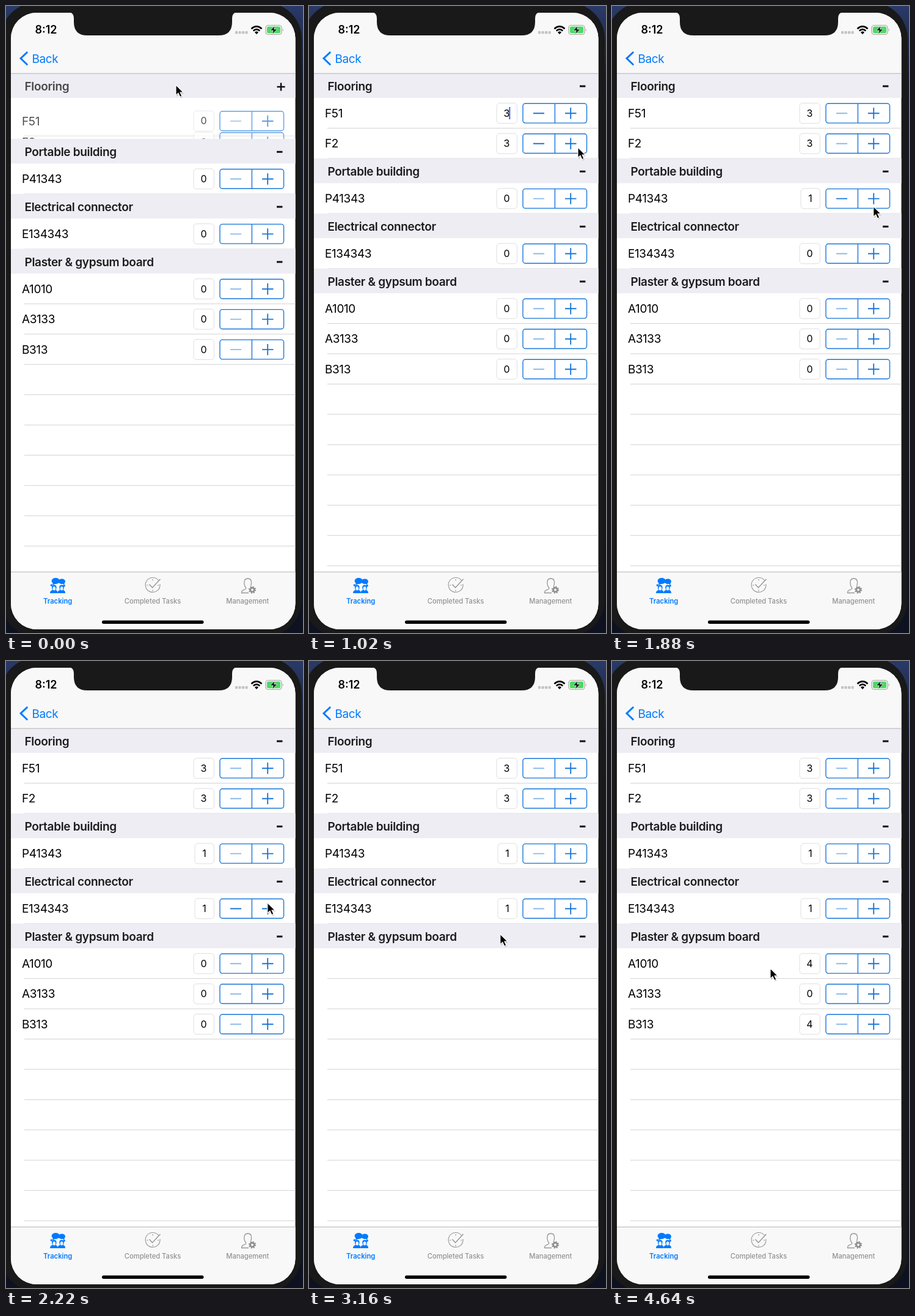
Recreate the animation shown at these times as an HTML page. Size 486x1024 px, loop 4660 ms.

```html
<!DOCTYPE html>
<html lang="en">
<head>
<meta charset="utf-8">
<title>Material tracking</title>
<style>
  html, body { margin: 0; width: 100%; height: 100%; overflow: hidden; background: #191919; }
  #stage { display: block; width: 486px; height: 1024px; font-family: Inter, Roboto, sans-serif; }
  .row, .back { font-size: 19px; letter-spacing: -.4px; }
  .head { font-size: 19px; font-weight: 600; letter-spacing: -.33px; fill: #1c1c1e; }
  .count { font-size: 16px; text-anchor: middle; }
  .tab { font-size: 11.2px; font-weight: 500; text-anchor: middle; fill: #929292; }
  .line { stroke: #d2d2d5; stroke-width: 1; }
  .step { fill: none; stroke: #1976d8; stroke-width: 1.4; }
  .blue { fill: #007aff; }
</style>
</head>
<body>
<svg id="stage" viewBox="0 0 486 1024">
  <defs>
    <linearGradient id="desk" x2="0" y2="1">
      <stop offset="0" stop-color="#2a3a68"/>
      <stop offset=".12" stop-color="#151c30"/>
      <stop offset="1" stop-color="#0d1120"/>
    </linearGradient>
    <clipPath id="screen"><rect x="8" y="11" width="465.5" height="1007" rx="42"/></clipPath>
  </defs>
  <rect width="486" height="1024" fill="url(#desk)"/>
  <rect x="-9" y="-6" width="493" height="1036" rx="60" fill="#191919"/>
  <g clip-path="url(#screen)">
    <rect x="8" y="11" width="466" height="1008" fill="#fff"/>
    <g id="list"></g>

    <rect x="8" y="11" width="466" height="99" fill="#f8f8f8"/>
    <path d="M8 110.2H474" stroke="#b4b4b6"/>
    <text x="47.5" y="45.3" font-size="18" font-weight="600">8:12</text>
    <g fill="#c3c3c5">
      <rect x="375" y="41" width="4.2" height="4.6" rx="1.4"/><rect x="380.5" y="41" width="4.2" height="4.6" rx="1.4"/>
      <rect x="386" y="41" width="4.2" height="4.6" rx="1.4"/><rect x="391.5" y="41" width="4.2" height="4.6" rx="1.4"/>
    </g>
    <g fill="none" stroke="#000" stroke-width="2.6">
      <path d="M401.5 37.2Q410 29.6 418.5 37.2"/><path d="M404.7 40.6Q410 35.8 415.3 40.6"/>
    </g>
    <path d="M407 43Q410 40.2 413 43L410 46.2Z"/>
    <rect x="425" y="31.5" width="26" height="15" rx="4" fill="none" stroke="#a4a4a4" stroke-width="1.2"/>
    <rect x="427" y="33.5" width="22" height="11" rx="2.3" fill="#4cd964"/>
    <path d="M452.8 36.8q2 2.2 0 4.6z" fill="#a4a4a4"/>
    <path d="M440 32.5L432.4 40H437.3L435.6 46L443.6 38H438.6Z" stroke="#f8f8f8" stroke-width=".7"/>
    <path d="M35.2 75L24 85.6L35.2 96.2" fill="none" stroke="#007aff" stroke-width="2.9"/>
    <text class="back blue" x="42.5" y="92.5">Back</text>

    <rect x="8" y="924" width="466" height="95" fill="#f8f8f8"/>
    <path d="M8 924.3H474" stroke="#b4b4b6"/>
    <g class="blue">
      <ellipse cx="81.3" cy="939" rx="6.7" ry="5"/>
      <path d="M77 941l-1 5 6-3z"/>
      <ellipse cx="91.4" cy="939.7" rx="5.6" ry="4.3"/>
      <path d="M92 942l3 4 1-5z"/>
      <circle cx="74.3" cy="946" r="1.7"/><circle cx="95.2" cy="946.8" r="1.7"/>
      <path id="body" d="M72 959q0-4.4 4.3-5.2q-1.3-2-1.3-4.2q0-4.2 3.8-4.2t3.8 4.2q0 2.2-1.3 4.2q3.4.8 3.4 5.2z"/>
      <use href="#body" x="12.3"/>
      <g fill="#f8f8f8"><ellipse cx="78.8" cy="951.3" rx="2.3" ry="3.2"/><ellipse cx="91.1" cy="951.3" rx="2.3" ry="3.2"/></g>
    </g>
    <text class="tab" x="84.7" y="976" style="fill:#007aff;font-weight:600">Tracking</text>
    <g fill="none" stroke="#979797" stroke-width="1.1">
      <path d="M249.5 938A12 12 0 1 0 252 944"/>
      <path d="M240 936v2.5M240 953.5v2.5M230 946h2.5M248 946h2.5"/>
      <path d="M234.5 944.5L239.5 950L252.5 936" stroke-width="1.5"/>
    </g>
    <text class="tab" x="240" y="976">Completed Tasks</text>
    <g fill="none" stroke="#979797" stroke-width="1.3">
      <path d="M397 958.5H385.5Q385.5 954.5 389 953.6Q393 952.7 392.7 950.2Q389.8 947 389.8 941.7Q389.8 935 395.7 935Q401.6 935 401.6 941.7Q401.6 944.8 400.4 947.2"/>
      <circle cx="403" cy="953.5" r="3.3" stroke-width="2.8" stroke="#8f8f8f"/>
      <circle cx="403" cy="953.5" r="5.2" stroke-width="1.9" stroke="#8f8f8f" stroke-dasharray="2.05 2.03"/>
    </g>
    <text class="tab" x="395.3" y="976">Management</text>
    <rect x="157" y="1003.5" width="166.5" height="5.4" rx="2.7"/>
  </g>
  <path d="M103 10Q111 11 111 20V26Q111 48 133 48H348Q370 48 370 26V20Q370 11 378 10Z" fill="#191919"/>
  <g id="pointer">
    <path d="M1 2V19L5 15.4L8 21.5L11 20L8.2 14.3H13.4Z" fill="#000" opacity=".18"/>
    <path d="M0 0V16.8L3.9 13.2L6.8 19.6L9.9 18.2L7 12H12.2Z" stroke="#fff" stroke-width="1.1"/>
  </g>
</svg>
<script>
const LOOP = 4660, TOP = 109.7, HEAD = 40.4, ROW = 49.45;
const list = document.getElementById('list');
const pointer = document.getElementById('pointer');

// Each row: label, click times, time at which its minus is disabled again
const sections = [
  ['Flooring', [['F51', [460, 540, 620], 1230], ['F2', [850, 910, 970], 1230]]],
  ['Portable building', [['P41343', [1620], 1900]]],
  ['Electrical connector', [['E134343', [2140], 2420]]],
  ['Plaster & gypsum board', [
    ['A1010', [2400, 2450, 2500, 2550], 3090],
    ['A3133', [], 0],
    ['B313', [2720, 2770, 2820, 2870], 3090]]]
];

// Pointer path: time, x, y
const path = [
  [0, 278, 129], [120, 290, 133], [400, 428, 178], [680, 430, 180], [830, 437, 228],
  [1020, 440, 231], [1240, 438, 236], [1440, 424, 324], [1700, 427, 318], [1960, 428, 330],
  [2120, 428, 395], [2240, 428, 395], [2370, 430, 488], [2580, 430, 490], [2690, 430, 588],
  [2890, 429, 590], [3080, 313, 446], [3580, 311, 447], [4020, 262, 458], [4640, 259, 502]
];

const clamp = v => Math.max(0, Math.min(1, v));
const ease = v => v * v * (3 - 2 * v);

function add(parent, tag, attrs, text) {
  const node = document.createElementNS('http://www.w3.org/2000/svg', tag);
  for (const key in attrs) node.setAttribute(key, attrs[key]);
  if (text) node.textContent = text;
  parent.appendChild(node);
  return node;
}

const move = (node, x, y) => node.setAttribute('transform', `translate(${x} ${y})`);

function makeRow(parent, [label, clicks, reset]) {
  const g = add(parent, 'g', {});
  add(g, 'text', { class: 'row', x: 26, y: 31.8 }, label);
  const box = add(g, 'rect', { y: 8.6, height: 33, rx: 5, fill: '#fff', stroke: '#dedee0' });
  const count = add(g, 'text', { class: 'count', y: 30.7 });
  const caret = add(g, 'path', { d: 'M328.3 15V35', stroke: '#3f5fe0', 'stroke-width': 2 });
  add(g, 'rect', { class: 'step', x: 350, y: 9.2, width: 104.5, height: 31.8, rx: 4 });
  add(g, 'path', { class: 'step', d: 'M402.4 9V41' });
  add(g, 'path', { class: 'step', d: 'M419 25.2H437.5M428.2 16V34.4', style: 'stroke-width:1.9' });
  const minus = add(g, 'path', { class: 'step', d: 'M367 25.2H385', style: 'stroke-width:1.9' });
  add(g, 'path', { class: 'line', d: `M30 ${ROW}H474` });
  return { g, box, count, caret, minus, clicks, reset, label };
}

const views = sections.map(([title, rows]) => {
  const body = add(list, 'svg', { x: 0, width: 486 });
  const head = add(list, 'g', {});
  add(head, 'rect', { x: 8, width: 466, height: HEAD, fill: '#eeedf3' });
  const text = add(head, 'text', { class: 'head', x: 30.5, y: 28 }, title);
  const sign = add(head, 'path', { fill: 'none', stroke: '#111' });
  return { body, head, text, sign, rows: rows.map(r => makeRow(body, r)) };
});
const blanks = add(list, 'path', { class: 'line', fill: 'none' });

function openness(i, t) {
  if (i === 0) return 1 - .333 * (1 - clamp(t / 80)) ** 2;
  if (i === 3) return 1 - ease(clamp((t - 3090) / 60)) + ease(clamp((t - 3560) / 80));
  return 1;
}

const showsPlus = (i, t) => i === 0 ? t < 70 : i === 3 && t >= 3180 && t < 3630;

function drawRow(row, i, open, t) {
  const rest = 1 - open;
  move(row.g, 0, i * ROW + rest * (39 - 45 * i));
  row.g.setAttribute('opacity', clamp(1 - rest * .95));
  const n = row.clicks.filter(c => c <= t).length;
  const left = n === 1 ? 309 : 307;
  row.box.setAttribute('x', left);
  row.box.setAttribute('width', 340.5 - left);
  row.count.setAttribute('x', (left + 340) / 2);
  row.count.textContent = n;
  row.minus.setAttribute('opacity', n && t < row.reset ? 1 : .5);
  row.caret.setAttribute('opacity', row.label === 'F51' && t >= 700 && t < 1230 ? 1 : 0);
}

function drawList(t) {
  let y = TOP;
  views.forEach((v, i) => {
    const open = openness(i, t), height = open * v.rows.length * ROW;
    move(v.head, 0, y);
    v.text.setAttribute('opacity', i ? 1 : 1 - .66 * (1 - open));
    const plus = showsPlus(i, t);
    v.sign.setAttribute('d', plus ? 'M443.5 22.3H456.5M450 15.8V28.8' : 'M443 21.3H452.4');
    v.sign.setAttribute('stroke-width', plus ? 2.5 : 3);
    y += HEAD;
    v.body.setAttribute('y', y);
    v.body.setAttribute('height', height + (i === 3 && open > 0 ? .6 : 0));
    v.rows.forEach((r, k) => drawRow(r, k, open, t));
    y += height;
  });
  let d = '';
  for (let ly = y + ROW; ly < 924; ly += ROW) d += `M30 ${ly}H474`;
  blanks.setAttribute('d', d);
}

function drawPointer(t) {
  let k = 0;
  while (k < path.length - 2 && path[k + 1][0] <= t) k++;
  const [t0, x0, y0] = path[k], [t1, x1, y1] = path[k + 1];
  const p = ease(clamp((t - t0) / (t1 - t0)));
  move(pointer, x0 + (x1 - x0) * p, y0 + (y1 - y0) * p);
}

function frame() {
  const t = performance.now() % LOOP;
  drawList(t);
  drawPointer(t);
  requestAnimationFrame(frame);
}
frame();
</script>
</body>
</html>
```
